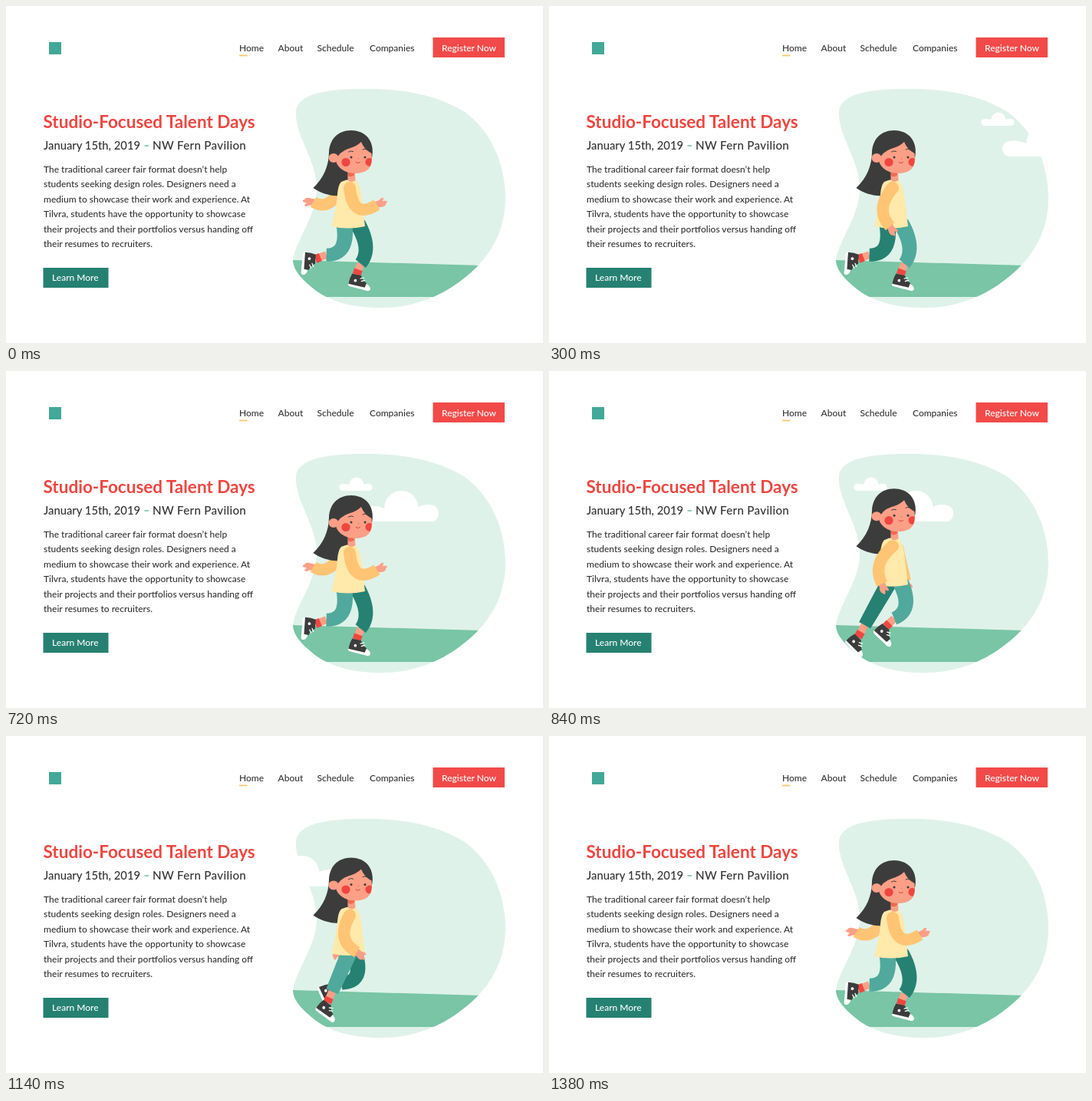
An HTML page that plays this animation: 700x439 px, repeating every 1.44 s.

```html
<!DOCTYPE html>
<html lang="en">
<head>
<meta charset="utf-8">
<title>Talent Days</title>
<style>
  html, body { margin: 0; width: 100%; height: 100%; overflow: hidden; background: #fff; }
  svg { display: block; width: 100%; height: 100%; }
  text { font: 500 12px Lato, "Open Sans", sans-serif; fill: #333; }
  .title { font-size: 22.5px; font-weight: 700; fill: #ee4640; }
  .date { font-size: 14.8px; }
  .place { font-size: 15.2px; letter-spacing: .3px; }
  .label { fill: #fff; }
  .skin { fill: #fc9f87; }
  .ink { fill: #3c3c3c; }
  .red { fill: #ef4640; }
  .sleeve { fill: #ffc574; }
  .near { fill: #50a99c; }
  .far { fill: #268172; }
  .line { fill: none; stroke: #3c3c3c; stroke-linecap: round; }
  .shin { stroke: #fc9f87; stroke-width: 10; }
  .sock { stroke: #ef4640; stroke-width: 11; }
</style>
</head>
<body>
<svg viewBox="0 0 700 439">
  <defs>
    <path id="blob" d="M378 137C380 115 415 108 465 108C510 107 560 114 598 138C635 165 651 210 651 250C651 300 625 335 590 360C560 382 525 393 492 393C450 394 420 383 403 370C388 358 375 346 374 332C376 308 404 275 405 240C406 200 376 170 378 137Z"/>
    <clipPath id="clip"><use href="#blob"/></clipPath>
    <g id="shoe">
      <path fill="#fff" d="M-14 3L9 0Q16 2 15.500 6Q15 8.500 12 8.500L-12 8Q-15 7-14 3Z"/>
      <path class="ink" d="M-12-9L0-9Q3-3 9-1L8 5L-14 5Q-14-3-12-9Z"/>
      <circle cx="-6" cy="-1" r="1.900" fill="#fff"/>
      <path d="M0-5l4-2M2-2l4-2" stroke="#fff" stroke-width="1.300" stroke-linecap="round"/>
    </g>
    <path id="hand" class="skin" d="M-2-4L4-5Q8-8 10-7Q11-5 8-3L13-2Q15 0 12 1L11 3Q8 5 3 4L-2 4Z"/>
  </defs>

  <use href="#blob" fill="#dff2e9"/>
  <path clip-path="url(#clip)" fill="#79c5a6" d="M370 331L620 338V379H370Z"/>
  <g id="clouds" fill="#fff">
    <path d="M10 196a10 10 0 0 1 1-20q8-2 21 3a22 22 0 0 1 44-2q10-5 19-2a10 11 0 0 1 1 21z"/>
    <path transform="translate(-28)" d="M5 156a4.500 4.500 0 0 1 1-9q4 0 8 1a9.500 9.500 0 0 1 19 0q4-2 8-1a4.700 4.700 0 0 1 0 9z"/>
  </g>

  <g id="farArm"></g>
  <path class="ink body" d="M450 162C432 162 422 174 421 190C421 208 414 224 400.500 237C410 244 424 248 434 247C443 240 448 228 450 212L472 208C481 200 484 163 450 162Z"/>
  <g id="farLeg"></g>
  <g id="nearLeg"></g>
  <g class="body">
    <path fill="#ffe9ab" d="M437 229Q447 224 456 227Q463 235 464 255L468 287Q446 292 424 287Q431 262 432 245Q433 233 437 229Z"/>
    <path class="skin" d="M445.500 212h9l1 15q-5 4-10 0z"/>
    <path fill="#f1694f" d="M446 217h8v3q-4 4-8 1z"/>
    <ellipse class="skin" cx="427" cy="198" rx="6.500" ry="6"/>
    <path class="skin" d="M430 201Q434 190 446 186Q457 183 463 177Q467 187 476.500 192L477 201Q476 217 457 218Q438 218 431 205Z"/>
    <circle class="red" cx="443" cy="203.500" r="5.600"/>
    <path class="red" d="M476.800 199a5.300 5.300 0 1 0-2 9.500q2-4 2-9.500z"/>
    <circle class="ink" cx="450" cy="197" r="1.500"/>
    <circle class="ink" cx="468" cy="197" r="1.500"/>
    <path class="line" d="M446.500 190q3-2 6-.500M465 187q3-2 5 0"/>
    <path class="line" stroke-width=".9" d="M456 203.500q3 2.500 5.500 0" style="stroke:#d33a35"/>
    <path class="line" d="M459.500 198q1.500 1 0 1.500" style="stroke:#ef7562"/>
  </g>
  <g id="nearArm"></g>

  <rect x="56" y="47" width="16" height="16" fill="#42a897"/>
  <text x="304" y="58.500">Home</text>
  <text x="354.500" y="58.500">About</text>
  <text x="405.500" y="58.500">Schedule</text>
  <text x="474" y="58.500">Companies</text>
  <path d="M304 64.500h10.500" stroke="#fbc766" stroke-width="1.800"/>
  <rect x="556.500" y="41" width="93.500" height="26" fill="#f14a49"/>
  <text class="label" x="568" y="58.500">Register Now</text>

  <text class="title" x="48.500" y="158.500">Studio-Focused Talent Days</text>
  <text class="date" x="49" y="186.500">January 15th, 2019</text>
  <path d="M180.500 182h5.500" stroke="#79c5a6" stroke-width="1.600"/>
  <text class="place" x="191" y="186.500">NW Fern Pavilion</text>
  <g id="copy"></g>
  <rect x="48.500" y="341" width="85" height="26" fill="#268172"/>
  <text class="label" x="60" y="358">Learn More</text>
</svg>
<script>
const $ = id => document.getElementById(id);
const STEP = 60, LOOP = 1440, HALF = 6;
const THIGH = 31, SHIN = 38;

$('copy').innerHTML = [
  'The traditional career fair format doesn’t help',
  'students seeking design roles. Designers need a',
  'medium to showcase their work and experience. At',
  'Tilvra, students have the opportunity to showcase',
  'their projects and their portfolios versus handing off',
  'their resumes to recruiters.'
].map((s, i) => `<text x="49" y="${217 + i * 19.4}">${s}</text>`).join('');

const mix = (a, b, u) => a + (b - a) * u;
const mixPt = (a, b, u) => a.map((v, i) => mix(v, b[i], u));
const rad = deg => deg * Math.PI / 180;

// Point at a distance from p; 0 degrees hangs down, positive swings right.
const hang = ([x, y], len, deg) => [x + len * Math.sin(rad(deg)), y + len * Math.cos(rad(deg))];

const place = (id, [x, y], deg) =>
  `<use href="#${id}" transform="translate(${x} ${y}) rotate(${deg})"/>`;

const line = (a, b, cls) => `<path class="${cls}" d="M${a}L${b}"/>`;

// Tapered band from a to b that bends at m, rounded at its start.
function band(a, m, b, w0, w1, cls) {
  const c = mixPt(mixPt(a, b, .5), m, 1.8);
  const left = [], right = [];
  for (let i = 0; i <= 12; i++) {
    const u = i / 12;
    const p = mixPt(a, c, u), q = mixPt(c, b, u);
    const [x, y] = mixPt(p, q, u);
    const dx = q[0] - p[0], dy = q[1] - p[1];
    const s = mix(w0, w1, u) / 2 / Math.hypot(dx, dy);
    left.push([x - dy * s, y + dx * s]);
    right.unshift([x + dy * s, y - dx * s]);
  }
  const r = w0 / 2;
  return `<path class="${cls}" d="M${left.join('L')}L${right.join('L')}A${r} ${r} 0 0 0 ${left[0]}Z"/>`;
}

// Knee between hip and ankle, bending forward; a long reach stays straight.
function knee(hip, ankle) {
  const dx = ankle[0] - hip[0], dy = ankle[1] - hip[1], d = Math.hypot(dx, dy);
  if (d >= THIGH + SHIN) return mixPt(hip, ankle, THIGH / (THIGH + SHIN));
  const a = (THIGH ** 2 - SHIN ** 2 + d * d) / (2 * d);
  const h = Math.sqrt(Math.max(0, THIGH ** 2 - a * a));
  return [hip[0] + (dx * a + dy * h) / d, hip[1] + (dy * a - dx * h) / d];
}

// The planted foot slides back, then its heel kicks up.
function push(u) {
  const slide = 1 - (1 - u) ** 4.5, kick = u ** 12;
  return {
    hip: mix(459, 441, slide),
    foot: [mix(461, 394, slide), 360 - 3 * slide - 22 * kick],
    deg: 13 + 35 * slide + 46 * kick
  };
}

// The lifted foot comes forward and lands.
function swing(u) {
  const ease = 1 - (1 - u) ** 2;
  return {
    hip: mix(441, 460, 1 - (1 - u) ** 5),
    foot: [mix(394, 462, ease), mix(335, 360, u * u * (3 - 2 * u))],
    deg: mix(94, 13, ease)
  };
}

function leg({ hip, foot, deg }, dy, cls) {
  const sin = Math.sin(rad(deg)), cos = Math.cos(rad(deg));
  const ankle = [foot[0] - 6 * cos + 9 * sin, foot[1] - 6 * sin - 9 * cos];
  const top = [hip, 285 + dy], bend = knee(top, ankle);
  const cuff = mixPt(bend, ankle, .6);
  return line(cuff, ankle, 'shin') +
    line(mixPt(cuff, ankle, .55), ankle, 'sock') +
    place('shoe', foot, deg) +
    band(top, bend, cuff, 21, 17, cls);
}

function arm(shoulder, upper, upperDeg, lower, lowerDeg) {
  const elbow = hang(shoulder, upper, upperDeg);
  const wrist = hang(elbow, lower, lowerDeg);
  return place('hand', wrist, 90 - lowerDeg) + band(shoulder, elbow, wrist, 16, 15, 'sleeve');
}

const bodies = document.querySelectorAll('.body');
let last = -1;

function draw(now) {
  const step = Math.floor(now % LOOP / STEP);
  if (step === last) return;
  last = step;

  const u = step % HALF / (HALF - 1);
  const first = Math.floor(step / HALF) % 2 === 0;
  const dy = -10.5 * Math.max(0, Math.sin(Math.PI * u ** 1.15)) ** 1.5;
  // 1 is arms wide apart, 0 is both hanging
  const s = first ? Math.cos(1.5 * Math.PI * u) : Math.sin(.5 * Math.PI * u);

  $('clouds').setAttribute('transform', `translate(${535 - .3072 * (step * STEP - 480)})`);
  bodies.forEach(b => b.setAttribute('transform', `translate(0 ${dy})`));
  $('farLeg').innerHTML = leg(first ? push(u) : swing(u), dy, 'far');
  $('nearLeg').innerHTML = leg(first ? swing(u) : push(u), dy, 'near');
  $('nearArm').innerHTML = arm([448, 237 + dy],
    30, -28 + 36 * s + 12 * s * s, 26, 24 + 53 * s + 27 * s * s);
  $('farArm').innerHTML = arm([450 - 14 * s, 240 + dy],
    25, -42 * s, 19, -60 * s - 40 * s * s);
}

const start = performance.now();
function tick() {
  draw(performance.now() - start);
  requestAnimationFrame(tick);
}
tick();
</script>
</body>
</html>
```
